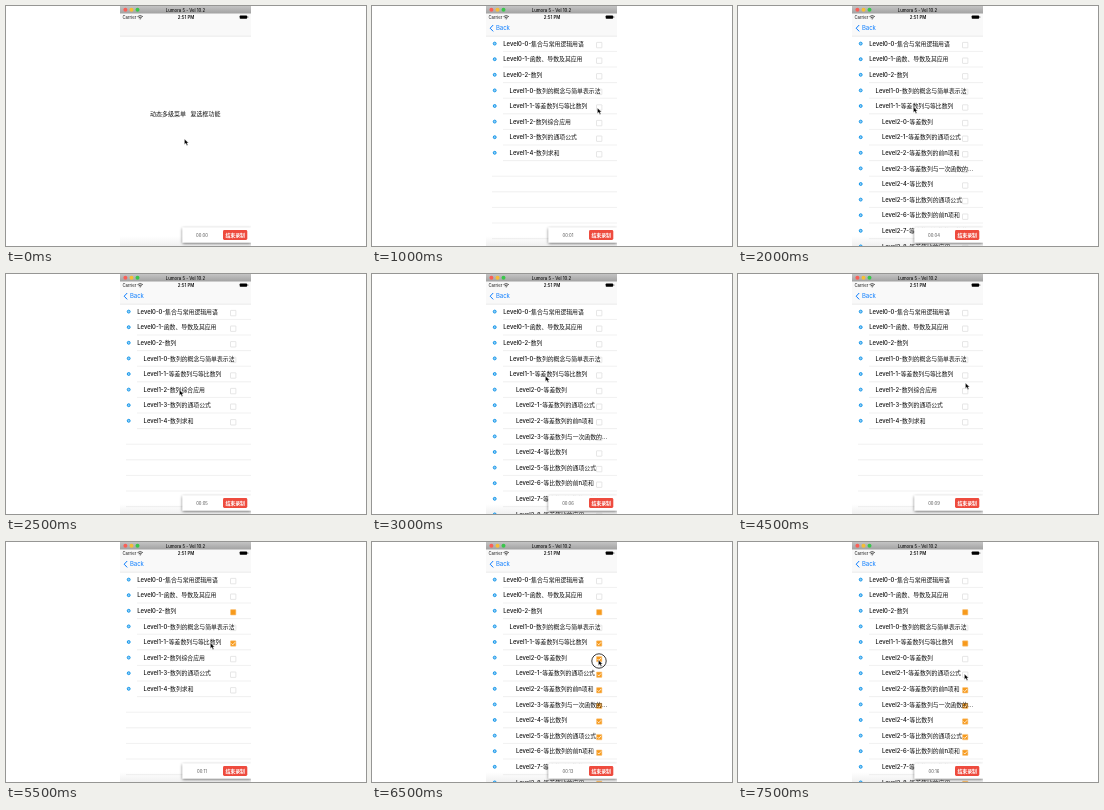
Recreate the animation shown at these times as an HTML page. Size 360 px wide and 240 px high, loop 8000 ms.

```html
<!DOCTYPE html>
<html lang="zh-CN">
<head>
<meta charset="utf-8">
<title>动态多级菜单</title>
<style>
html, body { margin: 0; width: 100%; height: 100%; overflow: hidden; background: #fff; }
svg { display: block; width: 360px; height: 240px; }
text { font-family: Inter, "Noto Sans CJK SC", "Noto Sans CJK", sans-serif; fill: #111; white-space: pre; }
.row { font-size: 5.86px; font-weight: 500; }
.blue { fill: #0a7cff; }
</style>
</head>
<body>
<svg id="stage" viewBox="0 0 360 240">
  <defs>
    <linearGradient id="chrome" x2="0" y2="1">
      <stop stop-color="#c4c4c4"/><stop offset="1" stop-color="#a2a2a2"/>
    </linearGradient>
    <linearGradient id="shade" x2="0" y2="1">
      <stop stop-color="#fff"/><stop offset="1" stop-color="#f0f0f0"/>
    </linearGradient>
    <filter id="shadow" x="-20%" y="-50%" width="140%" height="200%">
      <feDropShadow dx="0" dy="1" stdDeviation="1.6" flood-opacity=".6"/>
    </filter>
    <clipPath id="phone"><path d="M114 0H245V240H114Z"/></clipPath>
  </defs>
  <g clip-path="url(#phone)">
    <path d="M114 0H245V240H114Z" fill="#fff"/>
    <path d="M114 230H245V240H114Z" fill="url(#shade)"/>
    <path d="M114 7H245V30H114Z" fill="#f9f9f9"/>
    <path d="M114 30.2H245" stroke="#d4d4d4" stroke-width=".5"/>
    <path d="M114 0H245V7.5H114Z" fill="url(#chrome)"/>
    <circle cx="119.4" cy="3.8" r="2" fill="#f95f57"/>
    <circle cx="125.5" cy="3.8" r="2" fill="#f6bd36"/>
    <circle cx="131.5" cy="3.8" r="2" fill="#39c64b"/>
    <text x="179.5" y="5.5" font-size="4.3" font-weight="500" text-anchor="middle">Lumora 5 - Vel 10.2</text>
    <text x="116.5" y="12.8" font-size="4.2">Carrier</text>
    <g fill="none" stroke="#111" stroke-width=".7">
      <path d="M131.5 10.6Q134.2 8.5 136.9 10.6M132.6 11.8Q134.2 10.6 135.8 11.8"/>
      <path d="M133.7 12.8h1" stroke-width="1"/>
    </g>
    <text x="180" y="12.8" font-size="4.4" font-weight="600" text-anchor="middle">2:51 PM</text>
    <rect x="233.7" y="9.5" width="7.4" height="3.3" rx=".7"/>
    <path d="M241.8 10.5v1.3" stroke="#111" stroke-width=".6"/>
    <g id="screen"></g>
    <path d="M176.5 221.5H245V236.5H176.5Z" fill="#fff" filter="url(#shadow)"/>
    <text id="timer" x="196" y="230.6" font-size="4.2" text-anchor="middle" style="fill:#555"></text>
    <rect x="217" y="224" width="24.3" height="10" rx="1.4" fill="#ee4b3e"/>
    <text x="229.2" y="230.6" font-size="4.9" font-weight="600" text-anchor="middle" style="fill:#fff">结束录制</text>
    <g id="cursor">
      <circle id="ring" r="7.2" fill="none" stroke="#222" stroke-width=".9"/>
      <path d="M-.6 -1V4.4L.8 3.3L1.8 5.4L2.9 4.9L1.9 2.9H3.6Z" fill="#000" stroke="#fff" stroke-width=".4"/>
    </g>
  </g>
</svg>
<script>
const byId = id => document.getElementById(id);
const STEP = 500, PITCH = 15.6, FIRST = 37.6;

const topics = [
  ['集合与常用逻辑用语', '函数、导数及其应用', '数列'],
  ['数列的概念与简单表示法', '等差数列与等比数列', '数列综合应用', '数列的通项公式', '数列求和'],
  ['等差数列', '等差数列的通项公式', '等差数列的前n项和', '等差数列与一次函数的...', '等比数列',
   '等比数列的通项公式', '等比数列的前n项和', '等比数列与指数函数的...', '等差等比的应用']
];
const level = n => topics[n].map((name, i) => ({ key: `${n}-${i}`, depth: n, label: `Level${n}-${i}-${name}` }));
const [roots, children, leaves] = [0, 1, 2].map(level);
const menus = [
  [],
  roots,
  [...roots, ...children],
  [...roots, ...children.slice(0, 2), ...leaves, ...children.slice(2)]
];

// Checkbox states: 1 is ticked, 2 is partly selected.
const ticked = { '0-2': 2, '1-1': 1, ...Object.fromEntries(leaves.map(r => [r.key, 1])) };
const oneOff = { ...ticked, '1-1': 2, '2-0': 0 };
const twoOff = { ...oneOff, '2-1': 0 };

// Each step: open depth, seconds, cursor x, cursor y, pressed, checkbox states.
const steps = [
  [0, 0, 179, 134],
  [1, 0, 172, 70],
  [2, 1, 226, 103],
  [3, 3, 205, 102],
  [3, 4, 176, 102],
  [2, 5, 174, 117],
  [3, 6, 174, 103],
  [2, 7, 147, 70, true],
  [2, 8, 228, 102, true, ticked],
  [2, 9, 228, 110],
  [2, 10, 226, 103, false, ticked],
  [2, 11, 205, 102, false, ticked],
  [3, 12, 200, 103, false, ticked],
  [3, 13, 227, 119, true, ticked],
  [3, 15, 227, 121, false, oneOff],
  [3, 16, 227, 133, false, twoOff]
];

function checkbox(y, state) {
  const box = `<rect x="224.5" y="${y - 2.7}" width="5.4" height="5.4" rx=".4"
    fill="${state ? '#f79a1c' : 'none'}" stroke="${state ? '#f9c887' : '#d6d6d6'}" stroke-width=".6"/>`;
  const tick = `<path d="M225.5 ${y}l1.3 1.3 2.3 -2.6" fill="none" stroke="#fff" stroke-width=".8"/>`;
  return state === 1 ? box + tick : box;
}

function menu(rows, checks) {
  let out = `<path d="M121.2 19L118.2 22.2L121.2 25.4" fill="none" stroke="#0a7cff" stroke-width="1"/>
    <text class="blue" x="123.9" y="24.4" font-size="6">Back</text>`;
  for (let i = 0; i < 14; i++) {
    const y = FIRST + i * PITCH, row = rows[i];
    out += `<path d="M${row ? 131 : 120} ${y + 7.8}H245" stroke="#e0e0e0" stroke-width=".5"/>`;
    if (!row) continue;
    out += `<circle cx="122.7" cy="${y}" r="1.45" fill="#8fcdf6" stroke="#1597ea" stroke-width="1"/>
      ${checkbox(y + 1.5, checks[row.key])}
      <text class="row" x="${131.3 + row.depth * 6.3}" y="${y + 2.1}">${row.label}</text>`;
  }
  return out;
}

const home = `<text x="144" y="109.8" font-size="6">动态多级菜单</text>
  <text x="184.5" y="109.8" font-size="6">复选框功能</text>`;

let shown = -1;
function draw(now) {
  const index = Math.floor(now / STEP) % steps.length;
  if (index !== shown) {
    shown = index;
    const [open, seconds, x, y, pressed, checks = {}] = steps[index];
    byId('screen').innerHTML = open ? menu(menus[open], checks) : home;
    byId('timer').textContent = '00:' + String(seconds).padStart(2, '0');
    byId('cursor').setAttribute('transform', `translate(${x} ${y})`);
    byId('ring').style.display = pressed ? '' : 'none';
  }
}

const start = performance.now();
function tick() {
  draw(performance.now() - start);
  requestAnimationFrame(tick);
}
tick();
</script>
</body>
</html>
```
